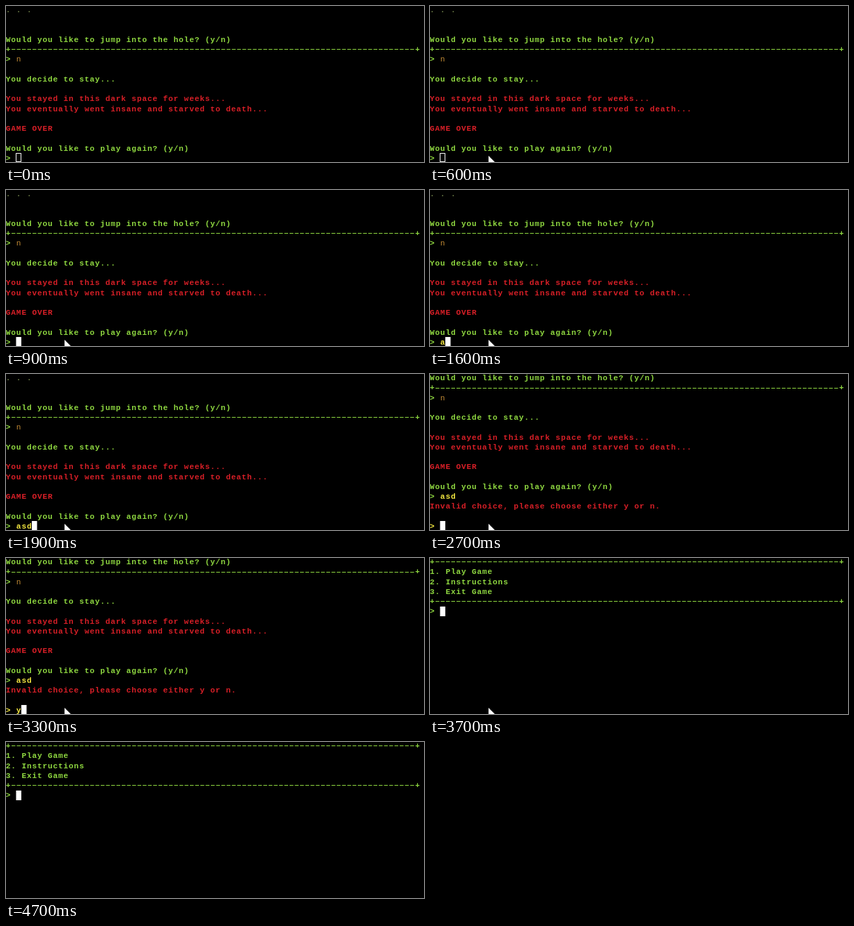
Recreate the animation shown at these times as an HTML page with a canvas. Size 600x225 px, loop 5.4 s.

```html
<!DOCTYPE html>
<html lang="en">
<head>
<meta charset="utf-8">
<title>Text adventure terminal</title>
<style>
  html, body { margin: 0; width: 100%; height: 100%; overflow: hidden; background: #000; }
  canvas { display: block; }
</style>
</head>
<body>
<canvas id="stage" width="600" height="225"></canvas>
<script>
const ctx = document.getElementById("stage").getContext("2d");
const LOOP = 5400, COL = 7.53, ROW = 14.25, LEFT = -0.6, TOP = -1.5;
const FONT_SIZE = 11.2, GLYPH = FONT_SIZE * 0.6, GAP = COL - GLYPH;
const GREEN = "#8fd840", RED = "#d81f27", YELLOW = "#f4e840", AMBER = "#c08a35", DIM = "#70804a";
const RULE_COLUMNS = 79;

// Each entry: row, text, colour, optional column.
const rule = row => [[row, "+", GREEN], [row, "+", GREEN, RULE_COLUMNS - 1]];
const STORY = [
  [0, ". . .", DIM],
  [3, "Would you like to jump into the hole? (y/n)", GREEN],
  ...rule(4),
  [5, ">", GREEN], [5, "n", AMBER, 2],
  [7, "You decide to stay...", GREEN],
  [9, "You stayed in this dark space for weeks...", RED],
  [10, "You eventually went insane and starved to death...", RED],
  [12, "GAME OVER", RED],
  [14, "Would you like to play again? (y/n)", GREEN],
  [15, ">", GREEN]
];
const RETRY = [
  ...STORY.slice(1).map(([row, ...rest]) => [row - 3, ...rest]),
  [12, "asd", YELLOW, 2],
  [13, "Invalid choice, please choose either y or n.", RED],
  [15, ">", YELLOW]
];
const MENU = [
  ...rule(0),
  [1, "1. Play Game", GREEN],
  [2, "2. Instructions", GREEN],
  [3, "3. Exit Game", GREEN],
  ...rule(4),
  [5, ">", GREEN]
];
const SCENES = [
  { until: 2000, lines: STORY, rules: [4], row: 15, keys: "asd", times: [1600, 1800, 1900] },
  { until: 3700, lines: RETRY, rules: [1], row: 15, keys: "y", times: [3300] },
  { until: LOOP, lines: MENU, rules: [0, 4], row: 5, keys: "", times: [] }
];

function write(row, text, color, col = 0) {
  const weight = color === AMBER ? "normal" : "bold";
  ctx.font = `${weight} ${FONT_SIZE}px 'Liberation Mono', monospace`;
  ctx.letterSpacing = GAP + "px";
  ctx.fillStyle = color;
  ctx.fillText(text, LEFT + col * COL + GAP / 2, TOP + 10.6 + row * ROW);
}

function drawDashes(row) {
  const y = Math.floor(TOP + 7.4 + row * ROW) + 0.5;
  ctx.strokeStyle = GREEN;
  ctx.lineWidth = 1;
  ctx.setLineDash([5.5, COL - 5.5]);
  ctx.beginPath();
  ctx.moveTo(LEFT + COL + 1, y);
  ctx.lineTo(LEFT + (RULE_COLUMNS - 1) * COL, y);
  ctx.stroke();
  ctx.setLineDash([]);
}

function drawCursor(row, col, focused) {
  const x = LEFT + col * COL, y = Math.round(TOP + row * ROW);
  ctx.fillStyle = ctx.strokeStyle = "#fff";
  ctx.lineWidth = 1;
  if (focused) ctx.fillRect(x, y, COL, 14);
  else ctx.strokeRect(Math.round(x) + 0.5, y + 0.5, 7, 12);
}

function drawPointer(x, y) {
  ctx.fillStyle = "#fff";
  ctx.beginPath();
  [[0, 0], [0, 13], [3, 10], [5, 15], [7, 14], [5, 9], [9, 9]]
    .forEach(([dx, dy]) => ctx.lineTo(x + dx, y + dy));
  ctx.fill();
}

function draw(t) {
  ctx.fillStyle = "#000";
  ctx.fillRect(0, 0, 600, 225);
  const scene = SCENES.find(s => t < s.until);
  const typed = scene.keys.slice(0, scene.times.filter(time => t >= time).length);
  scene.lines.forEach(line => write(...line));
  scene.rules.forEach(drawDashes);
  write(scene.row, typed, YELLOW, 2);
  drawCursor(scene.row, 2 + typed.length, t >= 700);
  if (t >= 400 && t < 4700) {
    const rise = Math.min(1, (Math.floor(t / 100) - 3) / 3);
    drawPointer(84, 225 - 9 * rise);
  }
}

function tick() {
  draw(performance.now() % LOOP);
  requestAnimationFrame(tick);
}
tick();
</script>
</body>
</html>
```
